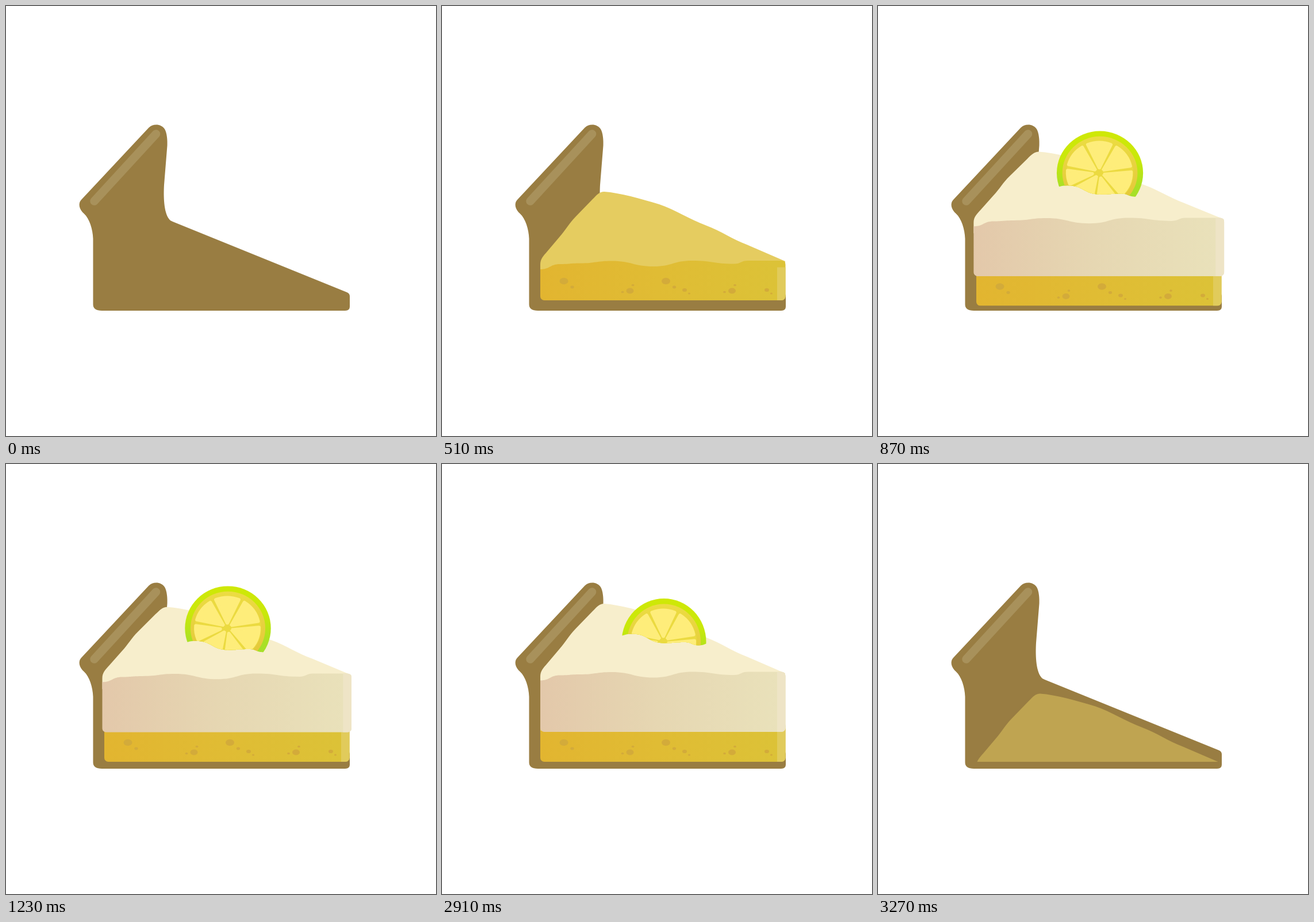
Animation of 748x748 px, one loop 3300 ms. Source, as an HTML page with a canvas:

```html
<!DOCTYPE html>
<html lang="en">
<head>
<meta charset="utf-8">
<title>Lime pie</title>
<style>
html, body { margin: 0; width: 100%; height: 100%; overflow: hidden; background: #fff; }
canvas { display: block; width: 748px; height: 748px; }
</style>
</head>
<body>
<canvas id="stage"></canvas>
<script>
const SIZE = 748, LOOP = 3300, STEP = 30;
const dpr = window.devicePixelRatio || 1;
const stage = document.getElementById('stage');
const buffer = document.createElement('canvas');
const [view, c] = [stage, buffer].map(el => {
  el.width = el.height = Math.round(SIZE * dpr);
  return el.getContext('2d');
});

// Easing and timing
const linear = u => u;
const sine = u => (1 - Math.cos(Math.PI * u)) / 2;
const out = u => 1 - (1 - u) * (1 - u);
const cubicIn = u => u * u * u;

const ramp = (t, from, to, ease = linear) =>
  ease(Math.min(1, Math.max(0, (t - from) / (to - from))));

// 0 before the part enters, 1 while it stays, 0 after it leaves
const stay = (t, [in0, in1], [out0, out1], easeIn, easeOut) =>
  ramp(t, in0, in1, easeIn) - ramp(t, out0, out1, easeOut);

// Sine-eased path through [time, value] pairs
const swing = (t, keys) => keys.reduce((sum, [time, value], i) =>
  i ? sum + (value - keys[i - 1][1]) * ramp(t, keys[i - 1][0], time, sine) : value, 0);

function pose(t) {
  return {
    filling: {
      sink: 72 * (1 - stay(t, [210, 450], [3100, 3300], out, out)),
      lift: swing(t, [[700, -6], [830, 4], [1010, 0]]),
      alpha: stay(t, [210, 270], [3240, 3300])
    },
    cream: {
      sink: 104 * (1 - stay(t, [510, 750], [2985, 3140], out, out)),
      lift: swing(t, [[680, -22], [790, 5], [980, 0]]),
      alpha: stay(t, [510, 570], [3080, 3140])
    },
    lime: {
      drop: 100 * (ramp(t, 630, 750, cubicIn) - 1) + 92 * ramp(t, 2880, 3060, out),
      edge: -26 * ramp(t, 2880, 3060, out),
      alpha: stay(t, [630, 715], [2970, 3030])
    },
    squash: swing(t, [[690, 0], [790, 1], [1020, -0.27], [1235, 0.5], [1710, 0]])
  };
}

// Drawing helpers
function gradient(x0, y0, x1, y1, colors) {
  const g = c.createLinearGradient(x0, y0, x1, y1);
  colors.forEach((col, i) => g.addColorStop(i / (colors.length - 1), col));
  return g;
}

function ellipse(x, y, rx, ry, fill) {
  c.beginPath();
  c.ellipse(x, y, rx, ry, 0, 0, 2 * Math.PI);
  c.fillStyle = fill;
  c.fill();
}

// Wavy line that is level at each crest and trough
function wave(pts) {
  c.lineTo(...pts[0]);
  for (let i = 1; i < pts.length; i++) {
    const [x0, y0] = pts[i - 1], [x1, y1] = pts[i], mid = (x0 + x1) / 2;
    c.bezierCurveTo(mid, y0, mid, y1, x1, y1);
  }
}

function clipAbove(y) {
  c.beginPath();
  c.rect(0, -SIZE, SIZE, SIZE + y);
  c.clip();
}

// Draws a group in the buffer, then lays it on the stage with one opacity
function layer(alpha, draw) {
  if (alpha <= 0) return;
  c.setTransform(dpr, 0, 0, dpr, 0, 0);
  c.clearRect(0, 0, SIZE, SIZE);
  c.save();
  draw();
  c.restore();
  view.globalAlpha = alpha;
  view.drawImage(buffer, 0, 0);
  view.globalAlpha = 1;
}

// Parts of the pie
const CRUST = new Path2D(`M131 337 L248 212 C256 204 270 205 276 214 C280 221 281 233 280.500 243
  L275 311 C274 329 274 359 284 371 Q285 373 291 375.500 L593 498 Q598 500 598 505
  V523 Q598 530 590 530 H167 Q151.500 530 151.500 519 V405
  C151 388 145 370 136 361.500 C127 354 125 343 131 337 Z`);

const FACE = new Path2D(`M171 475 V456 C171 446 176 441 183 433 L205 407 C215 396 221 384 232 373
  L262 342 C270 334 274 329 282 329 C310 331 345 341 378 351 C405 360 430 377 460 388
  C485 397 505 412 530 421 L597 450 V475 Z`);

const RIM = [
  [171, 464], [205, 455], [240, 453.5], [295, 449.5], [368, 459],
  [435, 449], [508, 454.5], [532, 449], [590, 449]
];

function drawCrust() {
  c.fillStyle = '#997d42';
  c.fill(CRUST);
  c.strokeStyle = '#a8915b';
  c.lineWidth = 14.5;
  c.lineCap = 'round';
  c.beginPath();
  c.moveTo(153.5, 339.5);
  c.lineTo(261, 222.5);
  c.stroke();
}

function drawSlab({ bottom, faceShift, face, front, glint, glintTop }) {
  c.save();
  c.translate(0, faceShift);
  c.fillStyle = face;
  c.fill(FACE);
  c.restore();

  c.beginPath();
  wave(RIM);
  c.quadraticCurveTo(597.5, 449, 597.5, 456);
  c.arcTo(597.5, bottom, 580, bottom, 7);
  c.arcTo(171, bottom, 171, 464, 7);
  c.closePath();
  c.fillStyle = gradient(171, 0, 583, 0, front);
  c.fill();
  c.save();
  c.clip();
  c.fillStyle = glint;
  c.fillRect(583, glintTop, 15, 120);
  c.restore();
}

function drawBubbles() {
  const dot = (x, y, r) => ellipse(x, y, r, r * 0.77, '#d3ab3a');
  for (const x of [212, 389.5]) {
    dot(x, 484.5, 7.5);
    dot(x + 14.5, 495, 3.2);
    dot(x + 102, 503.5, 2.4);
    dot(x + 115, 501.5, 6.5);
    dot(x + 120, 491.5, 2.4);
  }
  for (const x of [422, 565]) {
    dot(x, 500, 4);
    dot(x + 8, 506, 2);
  }
}

function drawFilling({ sink, lift }) {
  c.translate(0, lift);
  clipAbove(518);
  c.translate(0, sink);
  drawSlab({
    bottom: 518, faceShift: 0, face: '#e5cc60',
    front: ['#e2b530', '#e0bc34', '#dcc237'], glint: '#e1cb5b', glintTop: 460.5
  });
  drawBubbles();
}

function squashGroup(q, lift) {
  c.translate(384.3, 500 + lift);
  c.scale(1 + 0.033 * q, 1 - 0.044 * q);
  c.translate(-384.3, -500);
}

function drawCream({ sink, lift }, q) {
  squashGroup(q, lift);
  clipAbove(466);
  c.translate(0, sink - 87.5);
  drawSlab({
    bottom: 553.5, faceShift: 1.5, face: '#f7eecc',
    front: ['#e3c8aa', '#e6d7b2', '#e9e1ba'], glint: '#eee4c6', glintTop: 440
  });
}

const SPOKES = [-7, 52, 99, 152, 190, 243, 297, 353].map(d => d * Math.PI / 180);

function drawSegment(a, b) {
  const mid = (a + b) / 2, tip = 4 / Math.sin((b - a) / 2);
  c.beginPath();
  c.moveTo(tip * Math.cos(mid), tip * Math.sin(mid));
  c.arc(0, 0, 54, a + 0.1, b - 0.1);
  c.closePath();
  c.fill();
  c.stroke();
}

function drawLime({ drop, edge }, lift, q) {
  squashGroup(q, lift);
  c.save();
  c.translate(0, edge);
  c.beginPath();
  c.moveTo(0, -SIZE);
  wave([[0, 309], [305, 307], [331, 303.5], [386, 319.5], [422, 318], [447, 323.5], [466, 320], [SIZE, 320]]);
  c.lineTo(SIZE, -SIZE);
  c.restore();
  c.clip();

  c.translate(386, 281 + drop);
  ellipse(0, 0, 73.5, 75, gradient(0, -75, 0, 75, ['#cfe806', '#c9e80a', '#a9e026', '#9fdf30']));
  ellipse(0, 0, 64, 65.5, gradient(0, -65, 0, 65, ['#ecdc42', '#e7d03e', '#e3c438']));
  ellipse(0, 0, 57, 57, '#ebda40');

  c.translate(-1, -0.5);
  c.fillStyle = c.strokeStyle = '#feed7a';
  c.lineWidth = 6;
  c.lineJoin = 'round';
  for (let i = 0; i < 7; i++) drawSegment(SPOKES[i], SPOKES[i + 1]);
  ellipse(0, 0, 7, 6, '#ebda40');
}

function render(t) {
  const { filling, cream, lime, squash } = pose(t);
  view.fillStyle = '#fff';
  view.fillRect(0, 0, stage.width, stage.height);
  layer(1, drawCrust);
  layer(filling.alpha, () => drawFilling(filling));
  layer(cream.alpha, () => drawCream(cream, squash));
  layer(lime.alpha, () => drawLime(lime, cream.lift, squash));
}

const start = performance.now();
function tick() {
  const t = (performance.now() - start) % LOOP;
  render(Math.floor(t / STEP) * STEP);
  requestAnimationFrame(tick);
}
tick();
</script>
</body>
</html>
```
